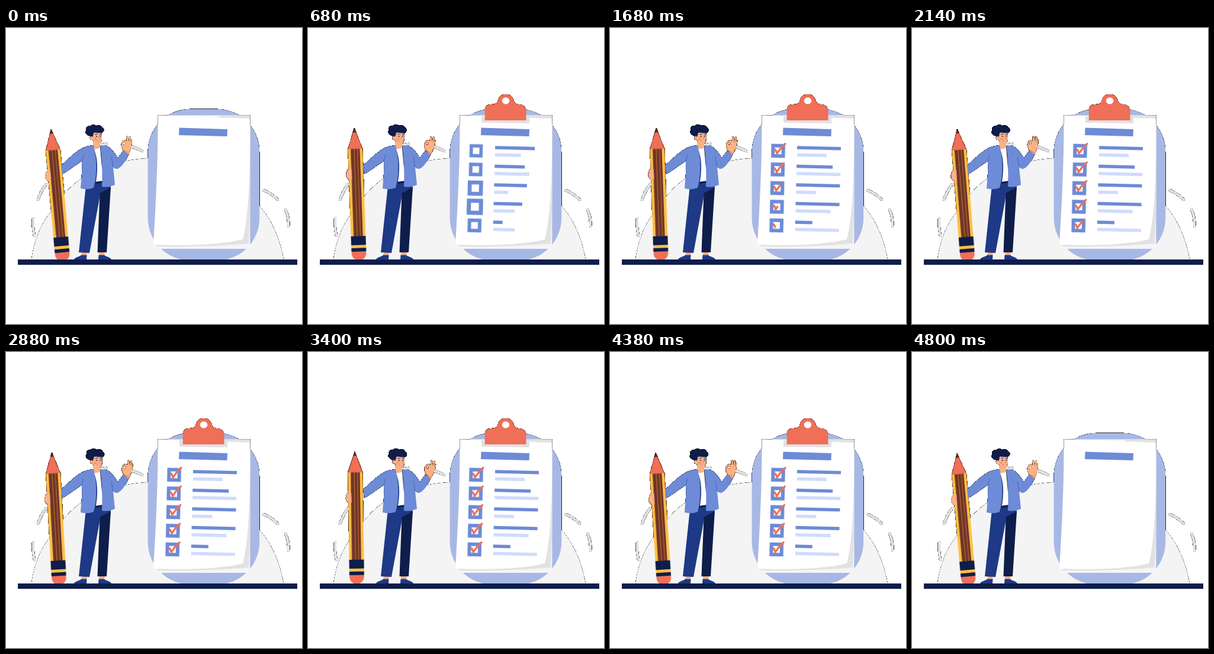
An HTML page for the animation above (4840 ms loop, 500 by 500 pixels).

```html
<!DOCTYPE html>
<html lang="en">
<head>
<meta charset="utf-8">
<title>Checklist</title>
<style>
  html, body { margin: 0; width: 100%; height: 100%; overflow: hidden; background: #fff; }
  svg { display: block; width: 100%; height: 100%; }
  .skin { fill: #fbb184; }
  .coat { fill: #6d8bd6; }
  .blue { fill: #1e3985; }
  .navy { fill: #0e1d4a; }
  .coral { fill: #ef6f57; }
  .gold { fill: #ffbf45; }
  .draw { fill: none; stroke-dasharray: 1 2; stroke-dashoffset: 1.02; }
  .box { fill: #fff; stroke: #6d8bd6; stroke-width: 6; transform-box: fill-box; transform-origin: center; }
  #head { transform-origin: 152px 200px; }
  #wave { transform-origin: 203px 211px; }
  #clip { transform-origin: 333.5px 156px; }
</style>
</head>
<body>
<svg viewBox="0 0 500 500">
  <!-- dark matte: half-covered pixels of the silhouette turn solid over black -->
  <filter id="matte" filterUnits="userSpaceOnUse" x="0" y="0" width="500" height="500" color-interpolation-filters="sRGB">
    <feComponentTransfer in="SourceAlpha" result="mask"><feFuncA type="discrete" tableValues="0 1 1 1 1"/></feComponentTransfer>
    <feComposite in="SourceGraphic" in2="mask" operator="over"/>
  </filter>
  <g filter="url(#matte)">
    <path fill="#f4f4f4" d="M43 391C49 350 63 325 78 308C96 281 110 266 128 254C158 235 195 222 240 220L428 300C450 325 463 357 469 391Z"/>
    <path fill="none" stroke="#e2e2e2" stroke-width="4.400" stroke-linecap="round" d="M46 322Q45 337 48 351M54 290Q59 275 68 264M163 197L170 196M210 200Q222 203 230 208M435 274Q448 279 459 290M472 307Q478 318 477 335"/>

    <rect x="239.600" y="136.800" width="188.600" height="256" rx="72" fill="#a8b8e5"/>
    <path fill="#f5f5f8" d="M256.600 147.500H412.400V373H258Z"/>
    <path fill="#e2e2e2" d="M360 147.500H412.400V300L410 364Q330 371 254 369L258 362H380Z"/>
    <path fill="#fff" d="M256.600 147.500L412 153C413 230 411 318 400 357C360 367 300 368 249 366C253 300 257 220 256.600 147.500Z"/>
    <path class="coat" d="M292.500 168.500L374 171L373.500 183L292 181Z"/>
    <g id="clip">
      <path fill="#e1e1e1" d="M293 149L374 150V161L293 160Z"/>
      <path class="coral" d="M298.700 156V137C300 131 304 129 309 129C318 129 320 126 321 121C324 108.500 344 108.500 347 121C349 127 352 129 358 129C364 130 368 133 368.500 139V156Z"/>
      <ellipse cx="334" cy="123" rx="6.300" ry="5.800" fill="#fff"/>
    </g>
    <g id="list"></g>

    <g id="pencil">
      <path class="coral" d="M-12 209H12.500V212A12.250 12 0 0 1 -12 212Z"/>
      <path class="gold" d="M-12.200 35H12.700V209H-12.200Z"/>
      <path fill="#6f3526" d="M-7.500 35H8V184H-7.500Z"/>
      <path fill="none" stroke="#d9863f" stroke-width=".8" d="M-1.500 35V184M4 35V184"/>
      <path class="navy" d="M-12.200 183H12.700V198H-12.200ZM-12.200 203H12.700V209H-12.200Z"/>
      <path class="coral" d="M0 0L12.700 35.500H-12.200Z"/>
      <path fill="#5a2422" d="M0 0L2.500 7.500H-2.500Z"/>
    </g>
    <path id="grip" class="skin" d="M75 241C71 239 67 242 67 246C65 250 66 256 70 258C72 260 75 260 76 257Z"/>

    <g id="man">
      <path class="skin" d="M128 377H137L136 386H127ZM157 377H167L166 386H157Z"/>
      <path class="blue" d="M115 391C116 387 124 387 127 383.500H136.500L136 391ZM156 391L156.500 383.500H166C169 387 177 387 178 391Z"/>
      <path class="blue" d="M135 266L123 379L141 380L159 282L177 272L176 258H146Z"/>
      <path class="navy" d="M158.500 279L177 269L170 379H154.500ZM147 258L164 257V261L147 264Z"/>
      <path class="skin" d="M147 192H159V204Q153 209 147 203Z"/>
      <path fill="#fff" d="M147 203Q153 206 159 202L164 258L150 260Z"/>
      <path class="blue" d="M147 202C155 215 156 240 151 264L146 268Z"/>
      <path class="coat" d="M148 198C138 199 132 201 127 204C115 211 104 222 93 232L95 247C107 240 118 231 128 225C129 242 127 257 126 271Q138 274 148 270C154 248 154 222 148 198Z"/>
      <path class="coat" d="M159 198C166 199 172 198 176 203C181 207 185 214 189 219L198 207L207 214C203 223 196 235 188 238Q183 238 181 235L184 265Q173 270 162 268C163 245 162 220 159 198Z"/>
      <path fill="none" stroke="#3d5cae" stroke-width=".8" d="M128 225L131 214M181 235L178 218"/>
      <g id="wave">
        <path class="skin" fill-rule="evenodd" d="M198 207C195 202 194 198 195 194C197 189 202 188 204 191L203 184Q205 181 206.500 184L207.500 192L208 184Q210 181 211 185L210.500 194L211.500 188Q213 187 213 190C213 198 211 206 207 214ZM197.500 195Q199.500 190.500 201.500 195Q200 200 197.500 195Z"/>
        <path fill="none" stroke="#e4694f" d="M198 207Q202 208 207 211"/>
      </g>
      <g id="head">
        <path class="skin" d="M144 176H161C162.500 184 162.500 190 160.500 194C156 199 149 196 146 189C141 189 140 181 145 182Z"/>
        <path class="navy" d="M144.500 186C142 184 141 181 140 182C134 180 133 175 136 173C133 169 138 165 142 166C144 162 150 163 152 165C157 163 162 165 162 168C167 170 166 175 162 177C156 178 151 176 148 177C147.500 180 147 184 144.500 186Z"/>
        <ellipse class="skin" cx="144" cy="186" rx="2.200" ry="3"/>
        <circle cx="151" cy="187.500" r="2" fill="#f58e72"/>
        <path fill="none" stroke="#0e1d4a" d="M150.500 180Q152.500 178.500 154.500 179.500M158 179.500Q160 178.500 161 179.500"/>
        <path class="navy" d="M152 182H153.500V184H152ZM158.500 181.500H160V183.500H158.500Z"/>
        <path fill="none" stroke="#e4774f" stroke-width=".8" d="M156.500 183L158.500 186.500H156.500"/>
        <path fill="#fff" stroke="#c4523f" stroke-width=".5" d="M153 190Q157 191 160 189Q158 194.500 153 190Z"/>
      </g>
    </g>
    <rect class="navy" x="20" y="391" width="472" height="9"/>
  </g>
</svg>
<script>
const LOOP = 4840, CUT = 4800;
const $ = id => document.getElementById(id);

function add(parent, tag, attrs) {
  const el = document.createElementNS('http://www.w3.org/2000/svg', tag);
  for (const k in attrs) el.setAttribute(k, attrs[k]);
  return parent.appendChild(el);
}

// steps: [ms, value, easing]; the first value returns at CUT
function play(el, prop, steps) {
  const first = steps[0][1], last = steps[steps.length - 1][1];
  const all = [[0, first], ...steps, [CUT, last], [CUT, first], [LOOP, first]];
  el.animate(all.map(([ms, value, easing = 'linear']) => ({ offset: ms / LOOP, [prop]: value, easing })),
    { duration: LOOP, iterations: Infinity });
}

function trace(el, start, length, easing) {
  play(el, 'strokeDashoffset', [[start, 1.02, easing], [start + length, 0]]);
}

function sway(id, from, to) {
  $(id).animate([
    { transform: from, easing: 'cubic-bezier(.3,.15,.65,1)' },
    { transform: to, easing: 'cubic-bezier(.37,0,.63,1)' },
    { transform: from }
  ], { duration: LOOP / 2, iterations: Infinity });
}

// widths of the dark and the light line in each row
const rows = [[74, 50], [61, 74], [74, 34], [74, 59], [29, 74]];
const list = $('list');

rows.forEach((widths, i) => {
  const x = 284 - .7 * i, y = 207.5 + 31.5 * i;
  const box = add(list, 'rect', { class: 'box', x: x - 8.7, y: y - 8.7, width: 17.4, height: 17.4 });
  const pop = 330 + 60 * i, size = s => `rotate(1.3deg) scale(${s})`;
  play(box, 'transform', [
    [pop, size(0), 'ease-out'], [pop + 165, size(1.17), 'ease-in-out'],
    [pop + 330, size(.95), 'ease-in-out'], [pop + 450, size(1)]
  ]);

  widths.forEach((w, j) => {
    const lx = 316 - .8 * i, ly = 202 + 31.5 * i + 12.2 * j;
    const line = add(list, 'path', {
      class: 'draw', d: `M${lx} ${ly}l${w} ${w * .024}`, pathLength: 1,
      stroke: j ? '#d0dcfb' : '#6d8bd6', 'stroke-width': 5.6
    });
    trace(line, 200 + 20 * (2 * i + j), 600, 'cubic-bezier(.37,0,.63,1)');
  });

  const tick = add(list, 'path', {
    class: 'draw', d: `M${x - 5} ${y - 2}Q${x - 3} ${y} ${x - 2} ${y + 4.5}Q${x + 4} ${y - 5} ${x + 12} ${y - 12}`,
    pathLength: 1, stroke: '#ef6f57', 'stroke-width': 3.2, 'stroke-linecap': 'round', 'stroke-linejoin': 'round'
  });
  trace(tick, 700 + 200 * i, 850);
});

play($('clip'), 'transform', [[0, 'scale(0)', 'cubic-bezier(.2,.6,.3,1)'], [340, 'scale(1)']]);

sway('pencil', 'translate(76px,171px) rotate(-5.1deg)', 'translate(79.3px,167.6px) rotate(-.5deg)');
sway('grip', 'translate(0px,0px)', 'translate(-2.4px,-4px)');
sway('head', 'rotate(0deg)', 'rotate(3.6deg)');
sway('wave', 'rotate(0deg)', 'rotate(9.6deg)');
</script>
</body>
</html>
```
